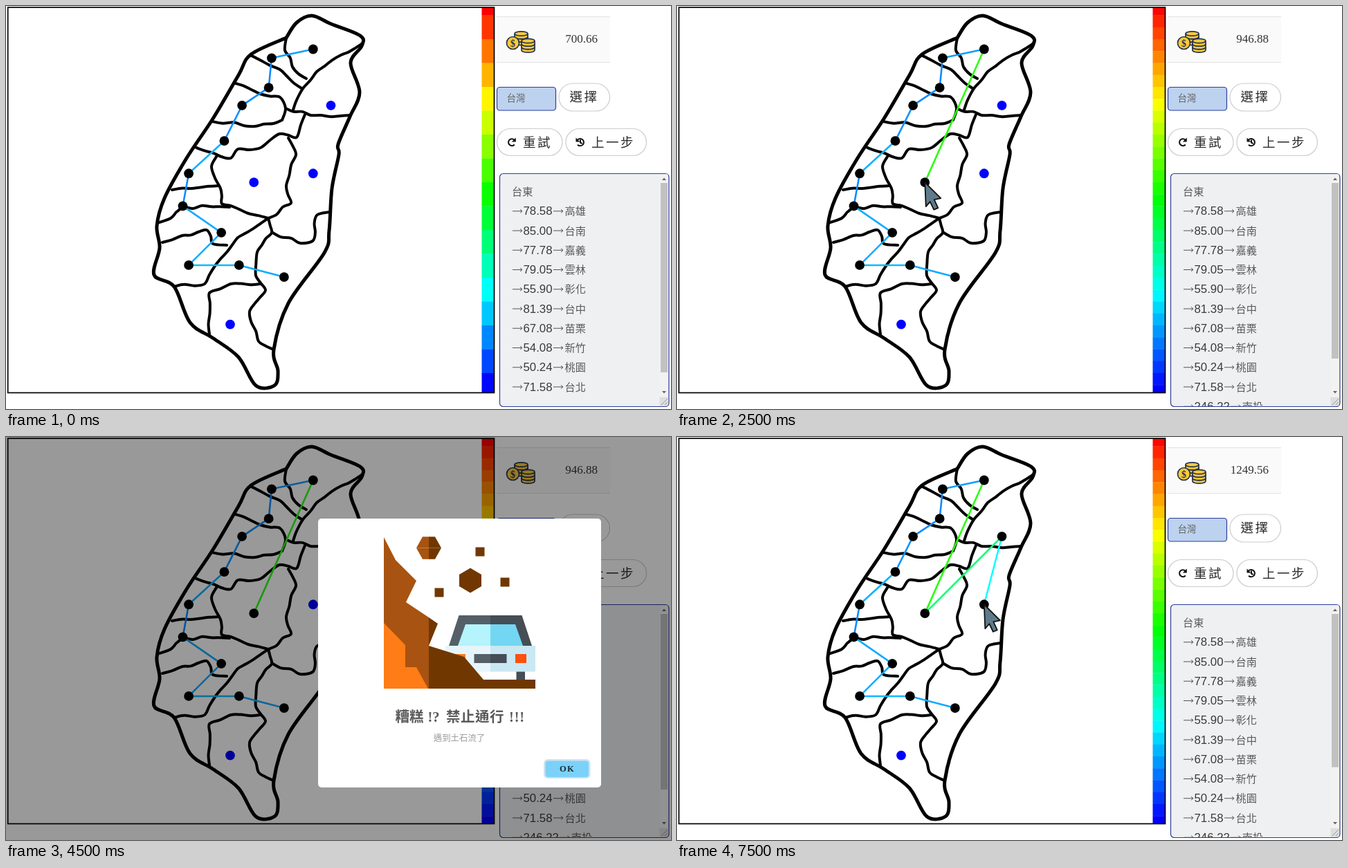
These frames come from a looping animation (961 by 583 pixels, 8000 ms). An HTML page:

```html
<!DOCTYPE html>
<html lang="zh-Hant">
<head>
<meta charset="utf-8">
<title>Route puzzle</title>
<style>
html, body { margin: 0; width: 100%; height: 100%; overflow: hidden; background: #fff; }
svg { display: block; width: 961px; height: 583px; }
text { font-family: "Noto Sans CJK TC", "Noto Sans CJK", "Noto Sans CJK JP", sans-serif; font-weight: 300; }
.num { font-family: "Liberation Sans", Arial, sans-serif; font-size: 16.8px; fill: #3a3a3a; font-weight: 400; }
.serif { font-family: "Liberation Serif", "Times New Roman", serif; font-weight: 400; }
.bold { font-weight: 700; }
.btn { font-size: 18.5px; letter-spacing: 2.5px; fill: #2a2a2a; }
.pill { fill: #fff; stroke: #ccc; stroke-width: 1.2; }
.field { stroke: #2b3d9c; stroke-width: 1.2; }
#map path { fill: none; stroke: #000; stroke-linecap: round; stroke-linejoin: round; }
</style>
</head>
<body>
<svg viewBox="0 0 961 583">
  <defs><clipPath id="box"><rect x="714" y="243" width="243" height="336"/></clipPath></defs>
  <rect width="961" height="583" fill="#fff"/>
  <g id="map"></g>
  <g id="bar"></g>
  <rect x="2.7" y="2" width="702.8" height="557.5" fill="none" stroke="#000" stroke-width="1.7"/>
  <g id="lines" stroke-width="2.6" stroke-linecap="round"></g>
  <g id="dots"></g>

  <rect x="709" y="15" width="164" height="67" fill="#fafafa"/>
  <path d="M709 15.5H873M709 81.5H873" stroke="#e2e2e2"/>
  <g id="coins" fill="#fbc93d" stroke="#25344f" stroke-width="1.7"></g>
  <text id="total" class="serif" x="855" y="53" font-size="17" text-anchor="end" fill="#333"></text>

  <rect class="field" x="709.5" y="117.5" width="85" height="33.5" rx="4" fill="#bcd2ef"/>
  <text x="723.5" y="137.5" font-size="13.5" fill="#666">台灣</text>
  <rect class="pill" x="799" y="112" width="73.5" height="40" rx="20"/>
  <text class="btn" x="814.5" y="138">選擇</text>
  <rect class="pill" x="709.5" y="177.5" width="94.5" height="39" rx="19.5"/>
  <text class="btn" x="747" y="203.5">重試</text>
  <rect class="pill" x="809" y="177.5" width="116.5" height="39" rx="19.5"/>
  <text class="btn" x="846" y="203.5">上一步</text>
  <g fill="none" stroke="#111" stroke-width="2">
    <path d="M734.5 193.5A5 5 0 1 0 734.8 200.5"/>
    <path d="M826 193.5A5.2 5.2 0 1 1 826 200.8M830 193.5V197.6L832.6 199"/>
  </g>
  <path d="M736.8 190.5V196.5H730.8ZM823.5 190.5V196.5H829.5Z" fill="#111"/>

  <rect class="field" x="713.5" y="242.5" width="244.5" height="337" rx="5" fill="#eef0f2"/>
  <g id="log" clip-path="url(#box)"></g>
  <rect x="945" y="243.5" width="11.5" height="322" fill="#f2f2f2"/>
  <path d="M948 252L951 248.5L954 252ZM948 557L951 560.5L954 557Z" fill="#666"/>
  <rect id="thumb" x="946" y="256" width="10" fill="#c1c1c1"/>
  <rect x="944.5" y="566" width="12" height="12.5" fill="#dedede"/>
  <path d="M947 577L956 568M952 577L956 573" stroke="#999"/>

  <g id="alert">
    <rect width="961" height="583" opacity=".4"/>
    <rect x="451" y="118" width="409" height="389" rx="5" fill="#fff"/>
    <g id="scene"></g>
    <g fill="#5a5a5a" font-size="20.5">
      <text class="bold" x="562.5" y="412">糟糕</text>
      <text class="serif bold" x="609.5" y="411.5">!?</text>
      <text class="bold" x="636" y="412" letter-spacing=".5">禁止通行</text>
      <text class="serif bold" x="727" y="411.5" letter-spacing=".8">!!!</text>
    </g>
    <text x="655" y="439.5" font-size="12.4" text-anchor="middle" fill="#999">遇到土石流了</text>
    <rect x="777" y="466" width="67.5" height="28" rx="6" fill="#cfe3f0"/>
    <rect x="779.5" y="468.5" width="62.5" height="23.5" rx="4" fill="#7cd1f9"/>
    <text class="serif bold" x="811" y="483.5" font-size="12.5" letter-spacing="1.2" text-anchor="middle" fill="#1c2a33">OK</text>
  </g>
  <path id="cursor" d="M0 0L23 23L13.5 25L19 37L13 39.5L7.5 28L1.5 35Z" fill="#5f7b8a" stroke="#111" stroke-width="1.8" stroke-linejoin="round"/>
</svg>
<script>
const $ = id => document.getElementById(id);

let seed = 7;
const rand = () => (seed = seed * 16807 % 2147483647) / 2147483647;
const points = text => text.split(' ').map(s => s.split(',').map(Number));

// Adds hand-drawn kinks between key points
function wobble(pts, size) {
  const out = [pts[0]];
  for (let i = 1; i < pts.length; i++) {
    const [[x, y], [u, v]] = [pts[i - 1], pts[i]];
    const len = Math.hypot(u - x, v - y), n = Math.max(1, Math.round(len / 14));
    for (let k = 1; k < n; k++) {
      const off = (rand() - .5) * size / len;
      out.push([x + (u - x) * k / n - (v - y) * off, y + (v - y) * k / n + (u - x) * off]);
    }
    out.push([u, v]);
  }
  return out;
}

function curve(p, width) {
  const at = i => p[Math.max(0, Math.min(p.length - 1, i))];
  let d = 'M' + p[0];
  for (let i = 0; i < p.length - 1; i++) {
    const [a, b, c, e] = [at(i - 1), at(i), at(i + 1), at(i + 2)];
    d += `C${b.map((v, k) => v + (c[k] - a[k]) / 6)} ${c.map((v, k) => v - (e[k] - b[k]) / 6)} ${c}`;
  }
  return `<path d="${d}" stroke-width="${width}"/>`;
}

const coast = '405,46 420,24 442,14 470,26 512,43 514,58 498,82 511,125 497,160 480,200 481,215 471,264 467,325 460,357 408,430 387,497 393,528 388,549 361,549 336,508 300,481 266,458 243,406 214,389 222,350 218,318 229,278 261,220 299,163 336,100 354,70 405,46';
const borders = [
  '405,46 403,64 414,88 434,105',
  '515,54 484,71 449,95 430,118 415,150',
  '353,71 396,92 427,119',
  '332,112 367,127 396,132 404,148 399,165',
  '298,167 360,174 399,165',
  '404,148 440,158 498,158',
  '275,205 325,220 335,207 368,205 395,185 420,190 426,172 432,157',
  '304,218 297,232 310,264 312,286 350,300 379,307',
  '408,191 419,215 405,260 412,285 379,307',
  '240,266 307,260',
  '219,314 238,307 257,291 323,291',
  '226,342 255,332 290,324 299,344 319,346',
  '379,307 335,335 302,376 287,402 243,406',
  '379,307 384,328 363,356 361,390 375,411 352,442 365,485 387,497',
  '368,402 325,402 294,415 294,475',
  '384,327 425,343 443,340 450,302 468,298'
];
$('map').innerHTML = curve(points(coast), 5) + borders.map(b => curve(wobble(points(b), 5), 4)).join('');

// Cities sit on a grid; a leg costs five per grid cell
const cell = 4.28;
const grid = {
  台東: [34.2, 77], 高雄: [19, 73], 台南: [2, 73], 嘉義: [13, 62], 雲林: [0, 53],
  彰化: [2, 42], 台中: [14, 31], 苗栗: [20, 19], 新竹: [29, 13], 桃園: [30, 3],
  台北: [44, 0], 南投: [24, 45], 宜蘭: [50, 19], 花蓮: [44, 42], 屏東: [16, 93]
};
const names = Object.keys(grid);
const place = name => [255.5 + cell * grid[name][0], 62.5 + cell * grid[name][1]];
const cost = (a, b) => Math.floor(500 * Math.hypot(grid[a][0] - grid[b][0], grid[a][1] - grid[b][1])) / 100;
const base = names.slice(0, 11), rebate = .02;

// Cities added to the base route, and where the pointer is
const steps = [
  { add: [], coarse: true },
  { add: ['宜蘭'], tip: place('宜蘭') },
  { add: [], tip: [877, 204] },
  { add: ['南投'], tip: place('南投') },
  { add: ['南投'], tip: place('花蓮') },
  { add: ['南投'], alert: true },
  { add: ['南投'], coarse: true },
  { add: ['南投', '宜蘭'], tip: place('宜蘭') },
  { add: ['南投', '宜蘭', '花蓮'], tip: place('花蓮') }
];
const loop = 8000, hold = 1000;

function bands(h) {
  let out = '';
  for (let y = 13.5 - h; y < 559; y += h) {
    const top = Math.max(2, y), end = Math.min(559, y + h);
    const hue = Math.max(0, Math.min(240, 240 * (y + h / 2 - 2) / 550));
    out += `<rect x="687.5" y="${top}" width="17.5" height="${end - top + .3}" fill="hsl(${hue},100%,50%)"/>`;
  }
  return out;
}

function leg(a, b) {
  const [x1, y1] = place(a), [x2, y2] = place(b);
  const hue = Math.min(209, 242 - .523 * cost(a, b));
  return `<line x1="${x1}" y1="${y1}" x2="${x2}" y2="${y2}" stroke="hsl(${hue},100%,53%)"/>`;
}

function logLine(name, i, route) {
  const y = 274 + i * 28.25;
  const word = x => `<text x="${x}" y="${y}" font-size="15.2" fill="#5a5a5a">${name}</text>`;
  if (!i) return word(731);
  const n = cost(route[i - 1], name).toFixed(2), x = 743.5 + n.length * 9.3;
  const arrow = x => `<path d="M${x + 1} ${y - 5.5}h14m-3 -2.5l3 2.5l-3 2.5" fill="none" stroke="#555"/>`;
  return arrow(731) + `<text class="num" x="747.5" y="${y}">${n}</text>` + arrow(x) + word(x + 17.5);
}

function show({ add, tip, alert, coarse }) {
  const route = base.concat(add);
  const sum = route.slice(1).reduce((s, name, i) => s + cost(route[i], name), -rebate);
  $('bar').innerHTML = bands(coarse ? 34.5 : 17.25);
  $('lines').innerHTML = route.slice(1).map((name, i) => leg(route[i], name)).join('');
  $('dots').innerHTML = names.map(name => {
    const [x, y] = place(name);
    return `<circle cx="${x}" cy="${y}" r="6.9" fill="${route.includes(name) ? '#000' : '#00f'}"/>`;
  }).join('');
  $('total').textContent = sum.toFixed(2);
  $('log').innerHTML = route.map(logLine).join('');
  $('thumb').setAttribute('height', 3480 / (route.length + 1.7));
  $('alert').style.display = alert ? '' : 'none';
  $('cursor').style.display = tip ? '' : 'none';
  if (tip) $('cursor').setAttribute('transform', `translate(${tip})`);
}

const coin = (x, y) => `<path d="M${x - 9.5} ${y}v4.5a9.5 3.2 0 0 0 19 0v-4.5"/><ellipse cx="${x}" cy="${y}" rx="9.5" ry="3.2"/>`;
const stack = (x, y) => [2, 1, 0].map(i => coin(x, y + i * 4.5)).join('');
$('coins').innerHTML = stack(744.5, 40) + stack(754.5, 50.5) +
  '<circle cx="732.5" cy="53.5" r="9"/><text class="serif bold" x="732.5" y="58.5" font-size="14" text-anchor="middle" fill="#25344f" stroke="none">$</text>';

const poly = (fill, pts) => `<polygon fill="${fill}" points="${pts}"/>`;
const block = (fill, x, y, w, h) => `<rect fill="${fill}" x="${x}" y="${y}" width="${w}" height="${h}"/>`;
// Symmetric trapezoid, lit on the left and shaded on the right
const pair = (x, top, bottom, y1, y2, ...fills) => fills.map((fill, i) => {
  const side = i ? 1 : -1;
  return poly(fill, [x, y1, x + side * top, y1, x + side * bottom, y2, x, y2]);
}).join('');
const hexagon = (x, y, r, ...fills) => pair(x, r / 2, r, y - r * .9, y, ...fills) + pair(x, r, r / 2, y, y + r * .9, ...fills);
const rust = '#a85311', dark = '#703800', orange = '#ff7c16', steel = '#545f68', slate = '#454d55';
$('scene').innerHTML = [
  pair(700, 45.5, 60, 258, 302, steel, slate),
  pair(700, 36, 47, 271, 302, '#b5f4fd', '#73d6f2'),
  pair(700, 65, 65, 302, 339.5, '#e6f5fb', '#c9e8f3'),
  pair(700, 23.5, 23.5, 314, 327, steel, slate),
  block(orange, 648, 314, 16, 13),
  block('#ff5010', 736, 314, 16, 13),
  block(slate, 737.5, 339.5, 12.5, 13),
  poly(rust, '546,145 563,178 593,208 578,239 611,261 611,364 546,364'),
  poly(dark, '611,261 624,270 611,302 662,318 690,351 765,351 765,364 611,364'),
  poly(orange, '546,269 577,301 577,333 593,333 610,364 546,364'),
  hexagon(611, 160.5, 18, rust, dark),
  poly(dark, '655,199 671,189.5 687,199 687,216 671,225.5 655,216'),
  block(dark, 678.5, 159.5, 13, 13),
  block(dark, 619.5, 218.5, 13, 13),
  block(dark, 714.5, 203.5, 13, 13)
].join('');

let current;
function frame(now) {
  const step = steps[Math.floor((now % loop + hold / 2) / hold)];
  if (step !== current) show(current = step);
  requestAnimationFrame(() => frame(performance.now() - start));
}
const start = performance.now();
frame(0);
</script>
</body>
</html>
```
